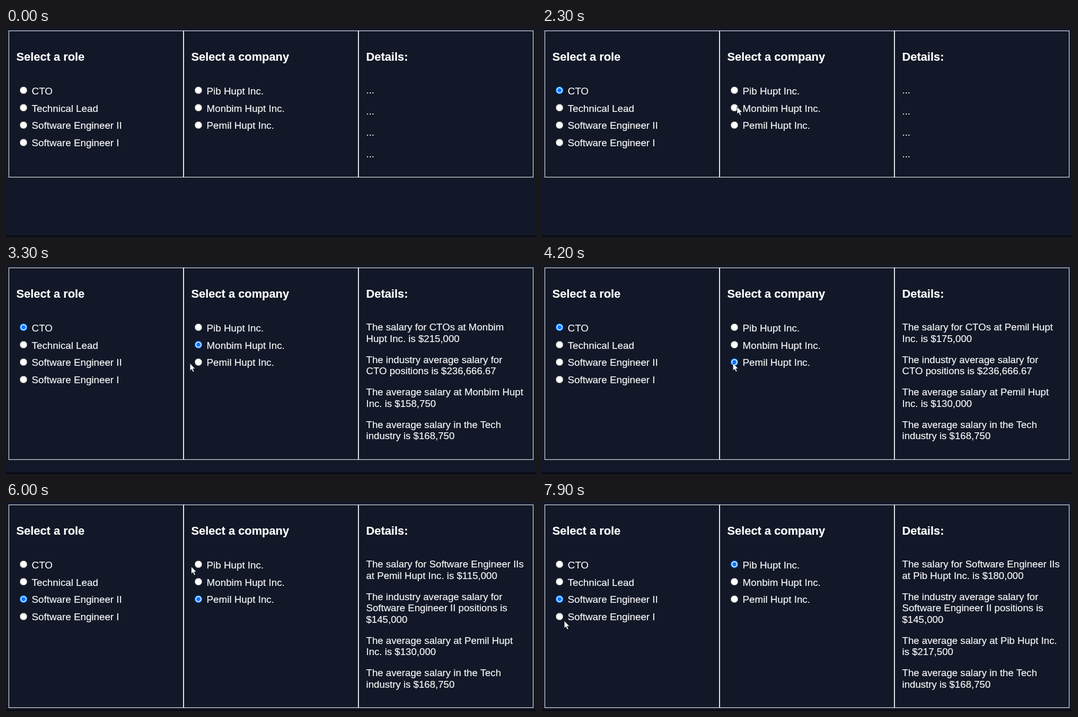
Animation, 1000 px wide and 396 px high, one loop 8 s. Source, as an HTML page:

```html
<!DOCTYPE html>
<html lang="en">
<head>
<meta charset="utf-8">
<title>Salary details</title>
<style>
  html, body { margin: 0; width: 100%; height: 100%; overflow: hidden; background: #121827; }
  body { position: relative; color: #f6f7f9; font: 18.65px/21.45px "Liberation Sans", Arial, sans-serif; -webkit-text-stroke: .2px; }
  body::after { content: ""; position: absolute; left: 0; top: 392.5px; width: 1000px; height: 4px; background: #080b14; }
  #panels { position: absolute; left: 5px; top: 5px; width: 990px; display: grid; grid-template-columns: repeat(3, 330px); }
  section { position: relative; box-shadow: inset 0 0 0 1px #dfe2e8, 0 0 0 1px #ffffff28; }
  h3 { position: absolute; left: 14.5px; top: 36.5px; margin: 0; font-size: 21.85px; line-height: 25px; color: #fff; white-space: nowrap; }
  .option { position: absolute; left: 43.6px; font-size: 18.8px; white-space: nowrap; }
  .option::before {
    content: ""; position: absolute; left: -23.6px; top: 1.5px; width: 16px; height: 16px;
    background: radial-gradient(circle, #fff 5.9px, #767676 6.5px 6.9px, transparent 7.5px);
  }
  .option.on::before {
    background: radial-gradient(circle, #0075ff 3.7px, #fff 4.4px 5.2px, #0075ff 5.9px 6.9px, transparent 7.5px);
  }
  #details { padding: 102.3px 15px 33.8px 14.5px; width: 300px; }
  p { margin: 0 0 18.65px; }
  p:last-child { margin: 0; }
  #cursor { position: absolute; left: 0; top: 0; width: 12px; height: 19px; overflow: visible; }
</style>
</head>
<body>
<div id="panels">
  <section id="roles"><h3>Select a role</h3></section>
  <section id="companies"><h3>Select a company</h3></section>
  <section><h3>Details:</h3><div id="details"></div></section>
</div>
<svg id="cursor"><path d="M0 0V14.2L3.2 11.3L5.5 16.6L7.9 15.6L5.7 10.4H10Z" fill="#fff" stroke="#0b0e18" stroke-width=".8"/></svg>
<script>
const LOOP = 8000, STEP = 100;
const byId = id => document.getElementById(id);
const roles = ["CTO", "Technical Lead", "Software Engineer II", "Software Engineer I"];
const companies = ["Pib Hupt Inc.", "Monbim Hupt Inc.", "Pemil Hupt Inc."];

// Salaries in thousands: one row per role, one column per company
const salaries = [[320, 215, 175], [235, 165, 140], [180, 140, 115], [135, 115, 90]];

// Each move eases the pointer to a point, bowed by `bend`, and may click an option there
const entry = { x: 1, y: 34 };
const moves = [
  { start: 200, end: 1000, x: 36, y: 119, bend: [400, 120], click: 1100, role: 0 },
  { start: 1200, end: 1600, x: 397, y: 146, bend: [60, 3] },
  { start: 1700, end: 2300, x: 368, y: 149, click: 2400, company: 1 },
  { start: 2600, end: 3500, x: 364, y: 186, bend: [-122, 22], click: 3900, company: 2 },
  { start: 4100, end: 5000, x: 37, y: 180, click: 5400, role: 2 },
  { start: 5500, end: 6100, x: 361, y: 120, click: 6500, company: 0 },
  { start: 6900, end: 7900, x: 42, y: 225, bend: [-60, 130] },
];

function addOptions(id, names) {
  return names.map((name, i) => {
    const option = document.createElement("div");
    option.className = "option";
    option.textContent = name;
    option.style.top = 103.8 + 32.8 * i + "px";
    byId(id).append(option);
    return option;
  });
}
const roleOptions = addOptions("roles", roles);
const companyOptions = addOptions("companies", companies);

const average = list => list.reduce((sum, n) => sum + n, 0) / list.length;
const dollars = thousands => "$" + (thousands * 1000).toLocaleString("en-US", { maximumFractionDigits: 2 });

function describe(role, company) {
  if (role === undefined || company === undefined) return Array(4).fill("...");
  const job = roles[role], firm = companies[company];
  return [
    `The salary for ${job}s at ${firm} is ${dollars(salaries[role][company])}`,
    `The industry average salary for ${job} positions is ${dollars(average(salaries[role]))}`,
    `The average salary at ${firm} is ${dollars(average(salaries.map(row => row[company])))}`,
    `The average salary in the Tech industry is ${dollars(average(salaries.flat()))}`,
  ];
}

function showChoice(t) {
  const { role, company } = Object.assign({}, ...moves.filter(m => m.click <= t));
  roleOptions.forEach((o, i) => o.classList.toggle("on", i === role));
  companyOptions.forEach((o, i) => o.classList.toggle("on", i === company));
  byId("details").innerHTML = describe(role, company).map(line => `<p>${line}</p>`).join("");
}

const ease = k => k * k * k * (k * (6 * k - 15) + 10);

function moveCursor(t) {
  const cursor = byId("cursor");
  cursor.style.visibility = t <= moves[0].start ? "hidden" : "visible";
  const index = Math.max(0, moves.findLastIndex(m => m.start <= t));
  const to = moves[index], from = moves[index - 1] ?? entry;
  const [bendX, bendY] = to.bend ?? [0, 0];
  const k = ease(Math.min(1, Math.max(0, (t - to.start) / (to.end - to.start))));
  const bow = 2 * k * (1 - k);
  const x = from.x + (to.x - from.x) * k + bendX * bow;
  const y = from.y + (to.y - from.y) * k + bendY * bow;
  cursor.style.transform = `translate(${x}px, ${y}px)`;
}

let shownAt;
function frame() {
  const t = Math.floor(performance.now() % LOOP / STEP) * STEP;
  if (t !== shownAt) {
    shownAt = t;
    showChoice(t);
    moveCursor(t);
  }
  requestAnimationFrame(frame);
}
frame();
</script>
</body>
</html>
```
